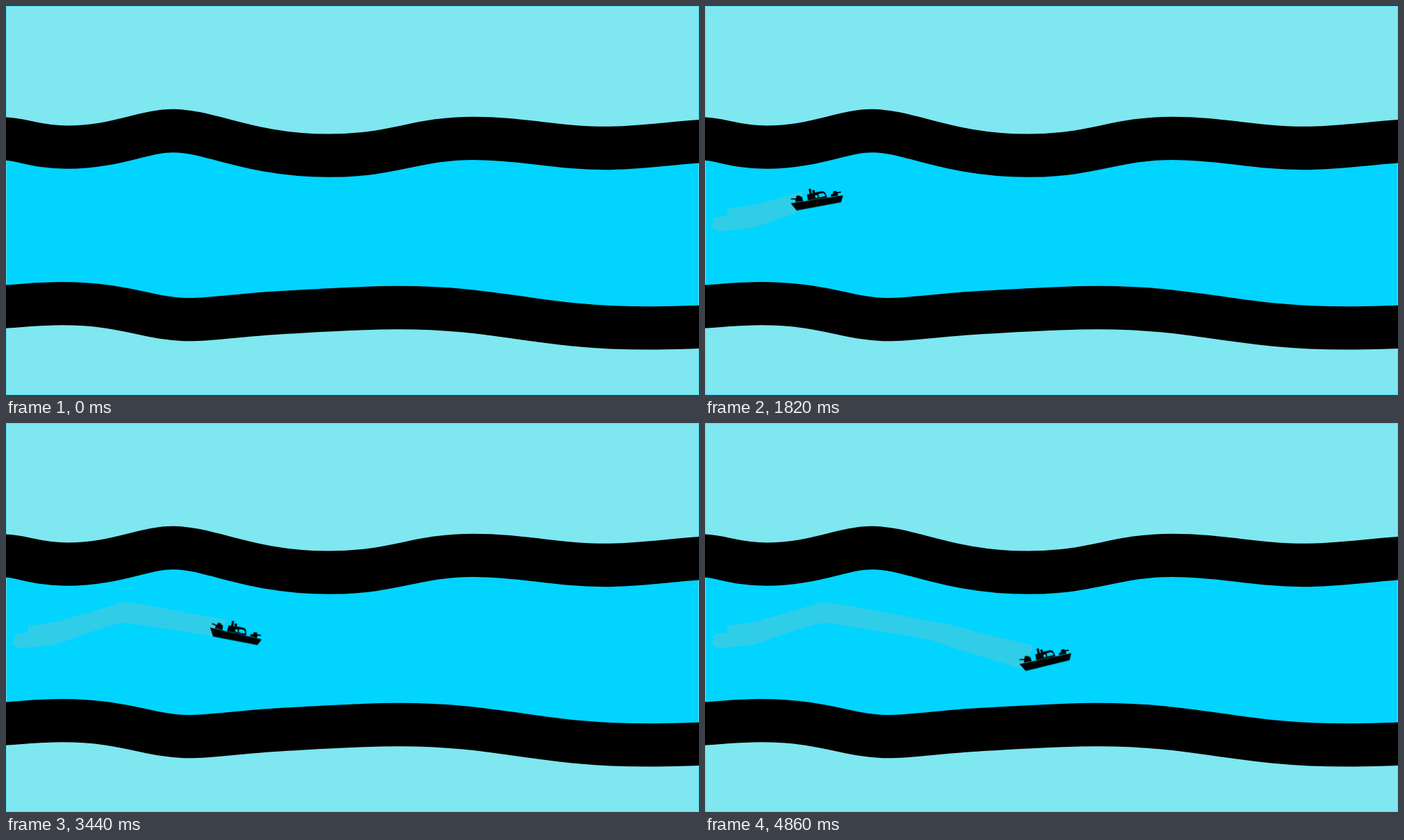
An HTML page for the animation above (4880 ms loop, 998x561 px).

```html
<!DOCTYPE html>
<html lang="en">
<head>
<meta charset="utf-8">
<title>Boat on a river</title>
<style>
html, body { margin: 0; width: 100%; height: 100%; overflow: hidden; background: #7ee7ef; }
svg { display: block; width: 100%; height: 100%; }
.bank { fill: none; stroke: #000; stroke-width: 62.3; }
.sail { transform-origin: 0 0; animation: sail 4880ms linear infinite; }
@keyframes sail {
  0% { transform: translate(-39px, 318px) rotate(0deg); }
  11.066% { transform: translate(24px, 307.5px) rotate(-15deg); }
  22.131% { transform: translate(81.2px, 295.5px) rotate(-27.8deg); }
  22.951% { transform: translate(85.3px, 294.5px) rotate(-27.8deg); }
  37.295% { transform: translate(160.5px, 275.9px) rotate(-10.6deg); }
  39.139% { transform: translate(170px, 274.2px) rotate(-8.2deg); }
  48.361% { transform: translate(215.9px, 277.5px) rotate(3.6deg); }
  70.492% { transform: translate(331.6px, 300.6px) rotate(11deg); }
  76.025% { transform: translate(360.7px, 306.4px) rotate(12deg); }
  84.016% { transform: translate(404.1px, 317px) rotate(2.6deg); }
  99.59% { transform: translate(489.3px, 336.9px) rotate(-13.8deg); }
  100% { transform: translate(491.5px, 337.4px) rotate(-14.2deg); }
}
</style>
</head>
<body>
<svg viewBox="0 0 998 561" preserveAspectRatio="none">
  <defs>
    <!-- everything astern of the boat -->
    <clipPath id="astern">
      <path class="sail" d="M-6-30V-700H-700V700H-36V20Z"/>
    </clipPath>
  </defs>

  <rect width="998" height="561" fill="#7ee7ef"/>
  <path fill="#00d4ff" d="M0 191.7C22 192 45 203.7 88 203.7C158 203.7 198 180 241 180C294 180 352 215.7 465 215.7C560 215.7 590 190.8 673 190.8C745 190.8 790 205 862 205C915 205 960 197 998 195.3V463C985 463 960 464.4 925 464.4C765 464.4 715 435 565 435C515 435 450 439.1 400 441.8C340 445 300 452.2 264 452.2C205 452.2 175 429.2 80 429.2C50 429.2 25 432 0 433.5Z"/>
  <rect x=".5" y=".5" width="997" height="560" fill="none" stroke="#5cdff3"/>

  <path class="bank" d="M-20 191.2L0 191.7C22 192 45 203.7 88 203.7C158 203.7 198 180 241 180C294 180 352 215.7 465 215.7C560 215.7 590 190.8 673 190.8C745 190.8 790 205 862 205C915 205 960 197 1010 194.6"/>
  <path class="bank" d="M-20 435L0 433.5C25 432 50 429.2 80 429.2C175 429.2 205 452.2 264 452.2C300 452.2 340 445 400 441.8C450 439.1 515 435 565 435C715 435 765 464.4 925 464.4C960 464.4 985 463 1010 462.6"/>

  <g clip-path="url(#astern)">
    <path fill="#30cde8" d="M32 292L50 290L75 286L120 273L170 258L195 261L350 290L400 303.5L490 325V362L455 354L372 329L325 313L300 308L180 289H163L135 297L100 309L85 315L66 320.5L18 325L13 321L8 317L14 311L9 309L17 304L32 302Z"/>
  </g>

  <g class="sail">
    <g transform="translate(1 13.5)">
      <!-- hull -->
      <path d="M-39.1-11.8L37.1-9.3L32.5 0H-32.5Z"/>
      <!-- stern gun -->
      <path d="M-37.6-18.7L-31-17.5L-29.6-18V-20.4L-28-21L-24.3-20.6V-18.7H-21.8L-20.8-11.8L-32.3-12.2L-31.2-15.8L-37.7-17.2Z"/>
      <!-- funnels -->
      <path d="M-10-27.3H-6.7V-19H-10Z"/>
      <path d="M-5.2-24.5H-1.9V-19H-5.2Z"/>
      <!-- cabin with windows -->
      <path fill-rule="evenodd" d="M-13.6-20H-2L-1.2-20.8H7C11.5-20.8 13.5-18 13.9-10.4L-14.2-11.2ZM-2.7-16.6V-12.7H.8V-16.6ZM2.5-17.7V-12.7H11.8C11.8-16 10.5-17.7 7.5-17.7Z"/>
      <!-- bow gun -->
      <path d="M20.4-14H23.6V-16.8L25-17.4H28.8V-15.5L35-15.2V-13.8L30-13.4V-10.1L19.4-10.5Z"/>
    </g>
  </g>
</svg>
</body>
</html>
```
